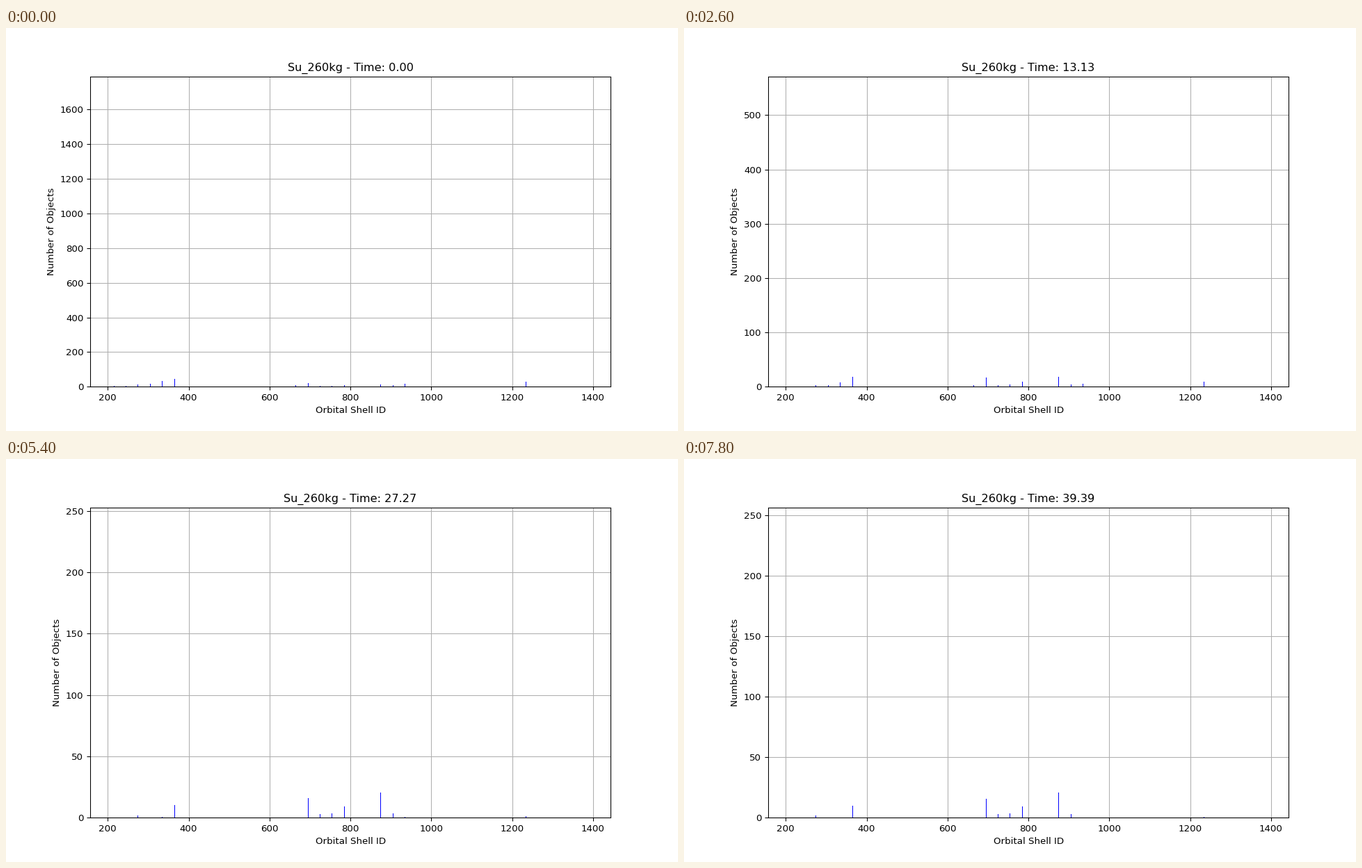
Animation of 966 by 580 pixels, one loop 8000 ms. Source, as a matplotlib script:

```python
import numpy as np
import matplotlib.pyplot as plt
from matplotlib.animation import FuncAnimation

W, H, DPI = 966, 580, 96.6
FRAMES, INTERVAL = 40, 200
YEARS_PER_FRAME = 100 / 99
X_MIN, X_MAX = 156.06, 1443.94

# Key points of the vertical axis limit: (step, limit)
LIMIT_KEYS = [(0, 1792), (8, 978), (13, 571.5), (17, 391.5),
              (23, 258.6), (30, 251.5), (39, 256.5)]

# Objects per occupied shell: first count, settled count
SHELLS = {
    215: (4, 0), 245: (4, 0), 275: (12, 1.7), 305: (15, 0.1),
    335: (32, 0.1), 365: (43, 9.6), 665: (8, 0.1), 695: (20, 15.8),
    725: (4, 2.9), 755: (4, 3.4), 785: (8, 9.1), 875: (12, 20.7),
    905: (8, 3.2), 935: (16, 0.1), 1235: (28, 0.3),
}


def monotone(keys, x):
    """Smooth curve through key points that never overshoots them."""
    xs, ys = np.array(keys, float).T
    h = np.diff(xs)
    d = np.diff(ys) / h
    a, b = d[:-1], d[1:]
    inner = np.where(a * b > 0, 2 * a * b / (a + b), 0)
    m = np.concatenate([d[:1], inner, d[-1:]])
    k = np.clip(np.searchsorted(xs, x, side="right") - 1, 0, len(h) - 1)
    t = (x - xs[k]) / h[k]
    return (ys[k] * (1 + 2 * t) * (1 - t) ** 2
            + m[k] * h[k] * t * (1 - t) ** 2
            + ys[k + 1] * t * t * (3 - 2 * t)
            + m[k + 1] * h[k] * t * t * (t - 1))


def count(shell, step):
    """Relax towards the settled count, faster in low shells due to drag."""
    first, settled = SHELLS[shell]
    tau = 11.5 * (1 - np.exp(-(shell - 200) / 60))
    return settled + (first - settled) * np.exp(-(step / tau) ** 1.4)


def limit(step):
    return np.exp(monotone([(s, np.log(v)) for s, v in LIMIT_KEYS], step))


fig, ax = plt.subplots(figsize=((W + 1e-3) / DPI, (H + 1e-3) / DPI), dpi=DPI)
ax.set_xlim(X_MIN, X_MAX)
ax.set_xlabel("Orbital Shell ID")
ax.set_ylabel("Number of Objects")
ax.grid(True)
title = ax.set_title("")

# Bars are exactly one pixel wide so that none vanishes when snapped
pixel = (X_MAX - X_MIN) / ax.bbox.width
bars = ax.bar(list(SHELLS), [0] * len(SHELLS), width=pixel, color="blue")
ax.set_xlim(X_MIN, X_MAX)


def update(i):
    for bar, shell in zip(bars, SHELLS):
        bar.set_height(count(shell, i))
    ax.set_ylim(0, limit(i))
    title.set_text(f"Su_260kg - Time: {i * YEARS_PER_FRAME:.2f}")
    return [*bars, title]


anim = FuncAnimation(fig, update, frames=FRAMES, interval=INTERVAL,
                     init_func=lambda: update(0), repeat=True,
                     repeat_delay=0, blit=False)
plt.show()
```
